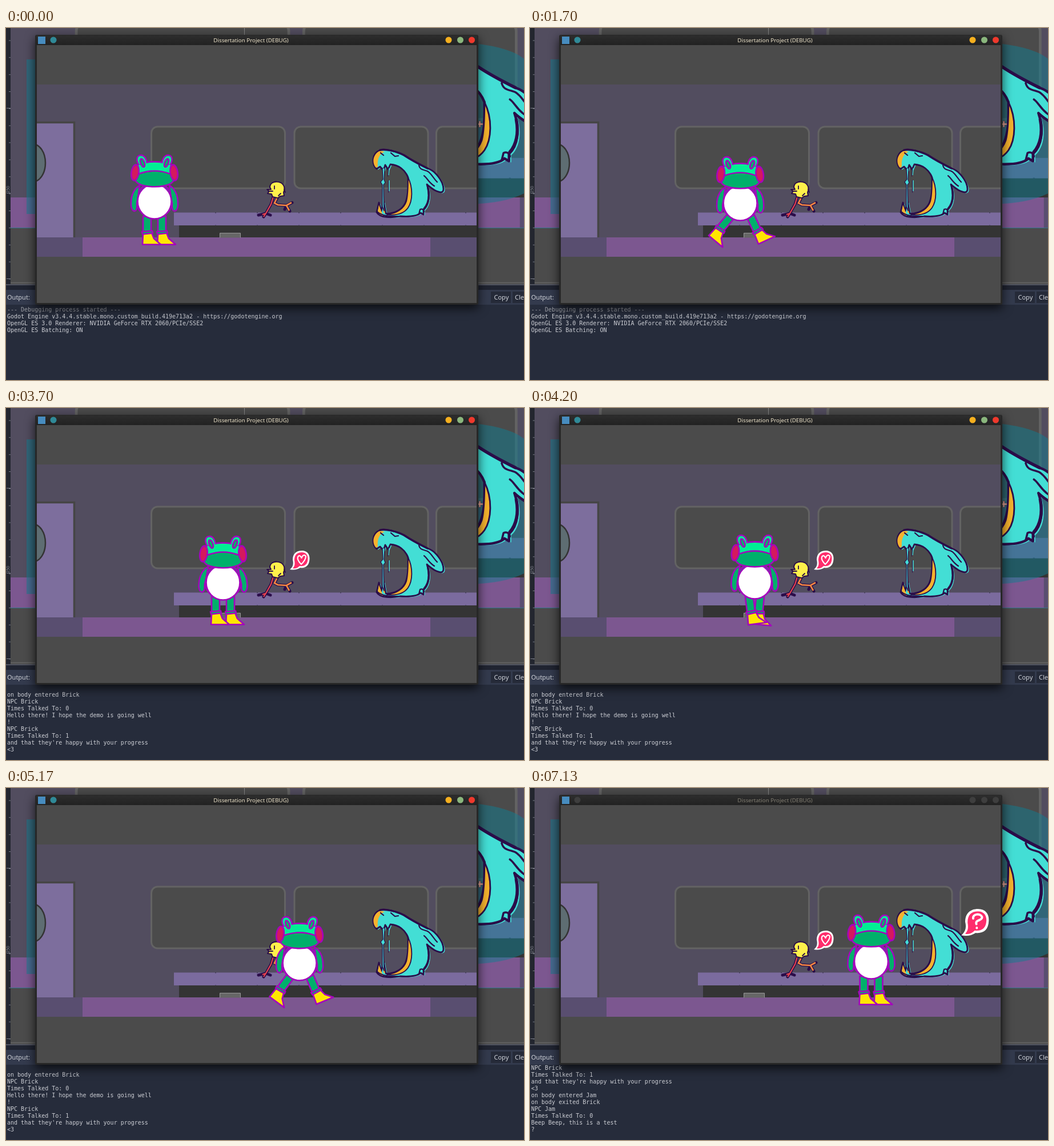
An HTML page that plays this animation: 907 by 617 pixels, repeating every 7.16 s.

```html
<!DOCTYPE html>
<html lang="en">
<head>
<meta charset="utf-8">
<title>Dissertation Project</title>
<style>
  html, body { margin: 0; width: 100%; height: 100%; overflow: hidden; background: #262c3b; }
  svg { display: block; width: 100vw; height: 100vh; }
  text { font-family: "Noto Sans", sans-serif; }
  #log text { font: 10px "DejaVu Sans Mono", monospace; fill: #ccced4; white-space: pre; }
  #window { filter: drop-shadow(0 6px 9px #000b); }
  .pane { fill: #4b4b4b; stroke: #636363; stroke-width: 3; }
  .frog { stroke: #a505bd; stroke-width: 2.6; stroke-linejoin: round; }
  .ink { fill: none; stroke: #2b0d49; stroke-linecap: round; stroke-linejoin: round; }
  .mark { fill: none; stroke: #fff; stroke-width: 2.1; stroke-linecap: round; stroke-linejoin: round; }
</style>
</head>
<body>
<svg viewBox="0 0 907 617">
  <defs>
    <clipPath id="editorClip"><path d="M8 0H907V449H8Z"/></clipPath>
    <clipPath id="gameClip"><path d="M54 30H824V482H54Z"/></clipPath>
    <clipPath id="logClip"><path d="M0 485H907V617H0Z"/></clipPath>
    <linearGradient id="bar" x2="0" y2="1"><stop stop-color="#2d2d2d"/><stop offset="1" stop-color="#222"/></linearGradient>

    <g id="train">
      <path fill="#4b4b4b" d="M54 30H824V482H54Z"/>
      <path fill="#524d5f" d="M54 99H824V401H54Z"/>
      <path fill="#7d6e9d" stroke="#454545" stroke-width="3.5" d="M40 165.5H119.5V370H40Z"/>
      <ellipse cx="47" cy="236.500" rx="22" ry="33" fill="#5e6d72" stroke="#333" stroke-width="2.500"/>
      <rect class="pane" x="254.500" y="173" width="234" height="108" rx="11"/>
      <rect class="pane" x="505" y="173" width="234" height="108" rx="11"/>
      <rect class="pane" x="753.500" y="173" width="234" height="108" rx="11"/>
      <path fill="#343434" d="M303 345H824V368H303Z"/>
      <path fill="#7b6b9e" d="M294 323.500H824V346H294Z"/>
      <path stroke="#3d3650" stroke-width="1.200" stroke-dasharray="2 71" d="M366 323.800H824M366 346H824"/>
      <path fill="#594e70" d="M54 367H824V401H54Z"/>
      <path fill="#7c5790" d="M134 367H743V401H134Z"/>
      <path fill="#666" stroke="#969696" d="M374.500 367.500V359.500H410.500V367.500"/>
    </g>

    <path id="beastShape" d="M649 247C640 239 640 220 655 214C664 211 686 217 697 223C709 231 724 239 738 246C752 250 766 270 766 282C766 290 760 289 750 284C744 280 740 277 737 274C743 292 741 310 731 319L731 327L726 324C720 330 705 331 690 330C675 333 655 333 649 323L653 306L657 321L661 304L665 325C680 326 694 318 699 307C705 293 704 276 704 262C699 249 688 240 673 239L669 248L664 240L661 250L655 243Z"/>
    <g id="beast">
      <use href="#beastShape" fill="#43ded5" transform="translate(2.500 1.500)"/>
      <use href="#beastShape" fill="#43ded5" stroke="#2b0d49" stroke-width="2.800" stroke-linejoin="round"/>
      <path fill="#f5b22e" d="M648 245C640 237 642 220 656 215L663 217C652 221 650 233 651 243ZM651 321L653 310L660 329L655 327ZM661 310L664 325L661 323Z"/>
      <path fill="#f5b22e" stroke="#2b0d49" stroke-width="1.800" stroke-linejoin="round" d="M704 262C713 280 712 303 704 315C697 325 684 329 667 327C685 325 697 316 701 304C704 293 704 275 704 262Z"/>
      <path fill="#43ded5" stroke="#2b0d49" stroke-width="1.200" d="M659 246L663 245L662 266L664 271L661 275L662 321L659 313V275L656 270L660 265Z"/>
      <path fill="none" stroke="#43ded5" stroke-width="1.500" d="M671 246L670 258M671 267L671 286"/>
      <path class="ink" stroke-width="1" d="M669.500 247L668.500 260M669.500 267V288"/>
      <path class="ink" stroke-width="2.200" d="M650 322C660 331 675 330 690 330M723 241C725 249 731 248 738 251C745 255 748 263 755 270M732 259C737 262 739 270 750 277M656 219L661 223M674 219L681 225L687 224M723 326L725 318C729 316 732 319 732 322"/>
      <path class="ink" stroke-width="3.500" d="M655 214C664 211 686 217 697 223C709 231 724 239 738 246M739 281C742 296 739 309 732 317"/>
    </g>

    <g id="bubble">
      <path fill="#fff" d="M497 283C502 279 504 274 502 266C502 256 508 250 518 250C528 250 532 257 531.500 265C531 276 525 281 515 280C509 284 503 284 497 283Z"/>
      <path fill="#ff2d6c" d="M502 281C506 277 506 273 505 267C505 257 510 253 518 253C526 253 529 259 528.500 265C528 274 523 278 514 277C510 281 506 282 502 281Z"/>
    </g>
    <g id="eye" class="frog">
      <path fill="#00ef94" d="M-28 239C-32 232 -32 224 -25 223C-18 222 -14 229 -13 237"/>
      <ellipse cx="-21" cy="236.500" rx="3.300" ry="7.500" fill="#00b06b" transform="rotate(-20 -21 236.500)"/>
    </g>
    <path id="arm" class="frog" fill="#00b06b" d="M-26 276C-36 281 -41 294 -41 306C-42 316 -38 321 -35 321C-31 320 -30 315 -31 308L-28 290Z"/>
    <g id="leg" class="frog">
      <path fill="#00b06b" d="M-7 -4H7V26H-7Z"/>
      <path fill="#ffe600" d="M-7 26L8 25L12 35L24 45.500H-8Z"/>
      <path fill="#00b06b" d="M-9 23L9 21.500L10 25.500L-8 27.500Z"/>
    </g>
  </defs>

  <!-- editor -->
  <path fill="#23262f" d="M0 0H907V617H0Z"/>
  <g clip-path="url(#editorClip)">
    <use href="#train" transform="translate(-281.600 -286.600) scale(1.590)"/>
    <path stroke="#858585" d="M417.500 0V14"/>
    <path fill="#107f92" fill-opacity=".5" d="M36 55H827V28C860 32 890 40 907 54V290C880 303 850 307 827 308V326H36Z"/>
    <use href="#beast" transform="translate(-281.600 -286.600) scale(1.590)"/>
    <path stroke="#2f7388" d="M8 350.500H907"/>
    <path stroke="#626262" stroke-width="2" d="M8 446.500H907"/>
    <path fill="#e8a899" stroke="#5a4650" stroke-width=".8" d="M828 163H831V167H835V170H831V174H828V170H824V167H828Z"/>
  </g>
  <path stroke="#777a84" stroke-width="3" stroke-dasharray="1 28.850" d="M6.500 21.500V449"/>
  <path stroke="#777a84" d="M1 140.500H8M1 289.500H8M1 439.500H8"/>
  <text transform="translate(6 289) rotate(-90)" font-size="7" fill="#8a8d96">250</text>

  <path fill="#202431" d="M0 449H907V460H0Z"/>
  <path stroke="#626570" stroke-width="1.500" d="M0 450H907"/>
  <path fill="#333a4d" d="M0 459H907V486H0Z"/>
  <path fill="#262c3b" d="M0 485H907V617H0Z"/>
  <path fill="#252a38" d="M849 462H884V482H849ZM887 462H907V482H887Z"/>
  <g font-size="11" fill="#d0d3da">
    <text x="2" y="476">Output:</text>
    <text x="854.500" y="476">Copy</text>
    <text x="891" y="476">Clear</text>
  </g>
  <g clip-path="url(#logClip)"><g id="log"></g></g>

  <!-- game window -->
  <g id="window">
    <rect x="51" y="12" width="776" height="473" rx="3" fill="#272727"/>
    <path fill="url(#bar)" d="M53 13H825V30H53Z"/>
  </g>
  <rect x="56" y="15" width="13" height="13" fill="#478cbf"/>
  <g fill="#3e3e3e"><circle cx="83" cy="21" r="5.500"/><circle cx="775" cy="21" r="5.500"/><circle cx="795.500" cy="21" r="5.500"/><circle cx="815.500" cy="21" r="5.500"/></g>
  <g id="buttons">
    <circle cx="83" cy="21" r="5.500" fill="#2f8a98"/>
    <circle cx="775" cy="21" r="5.500" fill="#f6b01e"/>
    <circle cx="795.500" cy="21" r="5.500" fill="#8ab77d"/>
    <circle cx="815.500" cy="21" r="5.500" fill="#ef382c"/>
  </g>
  <text id="title" x="429" y="25" font-size="9.750" text-anchor="middle" fill="#f0e6cc">Dissertation Project (DEBUG)</text>

  <g clip-path="url(#gameClip)">
    <use href="#train"/>
    <use href="#beast"/>
    <g id="duck">
      <path class="ink" stroke-width="5" d="M468 296L464 309L455 325M442 328L455 325L451 331M455 325L463 328"/>
      <path stroke="#ee4650" stroke-width="2" fill="none" d="M468 296L464 309L455 325L449 327M455 325L451 331"/>
      <path class="ink" stroke-width="5" d="M475 298L470 307L476 310L491 311M501 306L491 311L497 321M491 311L488 318"/>
      <path stroke="#f98a42" stroke-width="2.600" fill="none" d="M475 297L470 307L476 310L491 311L500 306M491 311L496 320"/>
      <path fill="#fff04b" stroke="#2b0d49" stroke-width="2" stroke-linejoin="round" d="M462 279C463 269 473 268 481 271C488 275 489 283 486 288L487 294L480 295L476 298L467 296L465 291L458 290L461 286L457 283L464 283Z"/>
      <path class="ink" stroke-width="1.800" d="M467 271L473 269M459 286H467M470 277V282M477 294L481 290M487 283L489 288"/>
    </g>
    <g id="brickBubble">
      <use href="#bubble"/>
      <path id="bang" class="mark" style="stroke-width:3" d="M518 257L517 267M517 272V273"/>
      <path id="heart" class="mark" d="M517 274C512 269 510 264 511 261C513 257 516 259 517.500 263C519 258 523 256 525 260C525 265 521 270 517 274Z"/>
    </g>
    <g id="jamBubble" transform="translate(59.200 -138) scale(1.400)">
      <use href="#bubble"/>
      <path class="mark" style="stroke-width:2.800" d="M512 262C511 256 521 255 523 260C524 265 514 263 516 269M516.500 273.500V274"/>
    </g>
    <g id="frog">
      <use id="legRight" href="#leg"/>
      <use id="legLeft" href="#leg"/>
      <g id="body">
        <ellipse class="frog" cy="302" rx="32" ry="31" fill="#00b06b"/>
        <g id="armLeft"><use href="#arm"/></g>
        <g id="armRight"><use href="#arm" transform="scale(-1 1)"/></g>
        <ellipse class="frog" cy="304" rx="29.500" ry="30.500" fill="#fff"/>
        <path class="frog" fill="#00b06b" d="M-34 242C-16 232 16 232 34 242C42 252 39 265 28 273C14 280 -14 280 -28 273C-39 265 -42 252 -34 242Z"/>
        <path class="frog" fill="#00ef94" d="M-34 242C-16 232 16 232 34 242L28 256Q0 245 -28 256Z"/>
        <ellipse class="frog" cx="-34" cy="253.500" rx="6.500" ry="14" fill="#d4195e" transform="rotate(8 -34 253)"/>
        <ellipse class="frog" cx="34" cy="253.500" rx="6.500" ry="14" fill="#d4195e" transform="rotate(-8 34 253)"/>
        <use href="#eye"/>
        <use href="#eye" transform="scale(-1 1)"/>
      </g>
    </g>
  </g>
</svg>
<script>
const LOOP = 7160, STEP = 278, BREATH = 1270;
const FIRST_TALK = 2250, SECOND_TALK = 3000, JAM_TALK = 6050, BLUR = 6950;
const walks = [
  [[870, 260], [1700, 368], [1795, 380]],
  [[4078, 380], [4570, 434], [5170, 514], [5905, 597.5]],
];
const messages = [
  [0, '--- Debugging process started ---',
    'Godot Engine v3.4.4.stable.mono.custom_build.419e713a2 - https://godotengine.org',
    'OpenGL ES 3.0 Renderer: NVIDIA GeForce RTX 2060/PCIe/SSE2', 'OpenGL ES Batching: ON'],
  [1800, '', 'on body entered Brick'],
  [FIRST_TALK, 'NPC Brick', 'Times Talked To: 0', 'Hello there! I hope the demo is going well', '!'],
  [SECOND_TALK, 'NPC Brick', 'Times Talked To: 1', "and that they're happy with your progress", '<3'],
  [5430, 'on body entered Jam'],
  [5520, 'on body exited Brick'],
  [JAM_TALK, 'NPC Jam', 'Times Talked To: 0', 'Beep Beep, this is a test', '?'],
];

const el = id => document.getElementById(id);
const move = (id, transform) => el(id).setAttribute('transform', transform);
const show = (id, on) => el(id).setAttribute('visibility', on ? 'inherit' : 'hidden');
const fade = (id, opacity) => el(id).setAttribute('opacity', opacity);

const lines = messages.flatMap(([time, ...texts]) => texts.map(text => ({ time, text })));
lines.forEach((line, i) => {
  line.node = document.createElementNS('http://www.w3.org/2000/svg', 'text');
  line.node.textContent = line.text;
  line.node.setAttribute('x', 2);
  line.node.setAttribute('y', 497 + 12 * i);
  el('log').append(line.node);
});
lines[0].node.style.fill = '#9a9ca3';

function position(t) {
  let x = 260;
  for (const path of walks)
    for (let i = 1; i < path.length; i++) {
      const [t0, x0] = path[i - 1], [t1, x1] = path[i];
      if (t >= t0) x = x0 + (x1 - x0) * Math.min(1, (t - t0) / (t1 - t0));
    }
  return x;
}

function drawFrog(t) {
  let swing = 0, bob = 0, sway = 0, idleSince = 0, walking = false;
  for (const path of walks) {
    const start = path[0][0], end = path[path.length - 1][0];
    if (t >= end) idleSince = end;
    else if (t >= start) {
      walking = true;
      swing = Math.cos((t - start) / STEP * 2 * Math.PI);
    }
  }
  if (walking) bob = 1.5 + 1.5 * swing;
  else {
    bob = 1 - Math.cos((t - idleSince) / BREATH * 2 * Math.PI);
    sway = 1.3 * bob;
  }
  // Legs spread wide on the outward swing and barely cross on the inward one.
  const [left, right, shift] = swing > 0 ? [40, -25, 7] : [8, -6, 4];
  move('frog', `translate(${position(t)} 0)`);
  move('legLeft', `translate(${-13 - shift * swing} 334) rotate(${left * swing})`);
  move('legRight', `translate(${13 + shift * swing} 334) rotate(${right * swing})`);
  move('body', `translate(0 ${bob})`);
  move('armLeft', `rotate(${sway} -29 280)`);
  move('armRight', `rotate(${-sway} 29 280)`);
}

function drawLog(t) {
  const count = lines.filter(line => line.time <= t).length;
  lines.forEach((line, i) => line.node.setAttribute('visibility', i < count ? 'inherit' : 'hidden'));
  move('log', `translate(0 ${Math.min(0, 117 - 12 * count)})`);
}

function draw(now) {
  let t = now % LOOP;
  // The motion stalls twice.
  if (t > 30 && t < 170) t = 30;
  if (t > 900 && t < 1170) t = 900;
  drawFrog(t);
  drawLog(t);
  show('brickBubble', t >= FIRST_TALK);
  show('bang', t < SECOND_TALK);
  show('heart', t >= SECOND_TALK);
  show('jamBubble', t >= JAM_TALK);
  const blur = Math.min(1, Math.max(0, (t - BLUR) / 180));
  fade('buttons', 1 - blur);
  fade('title', 1 - 0.55 * blur);
}

const began = performance.now();
(function tick() {
  draw(performance.now() - began);
  requestAnimationFrame(tick);
})();
</script>
</body>
</html>
```
